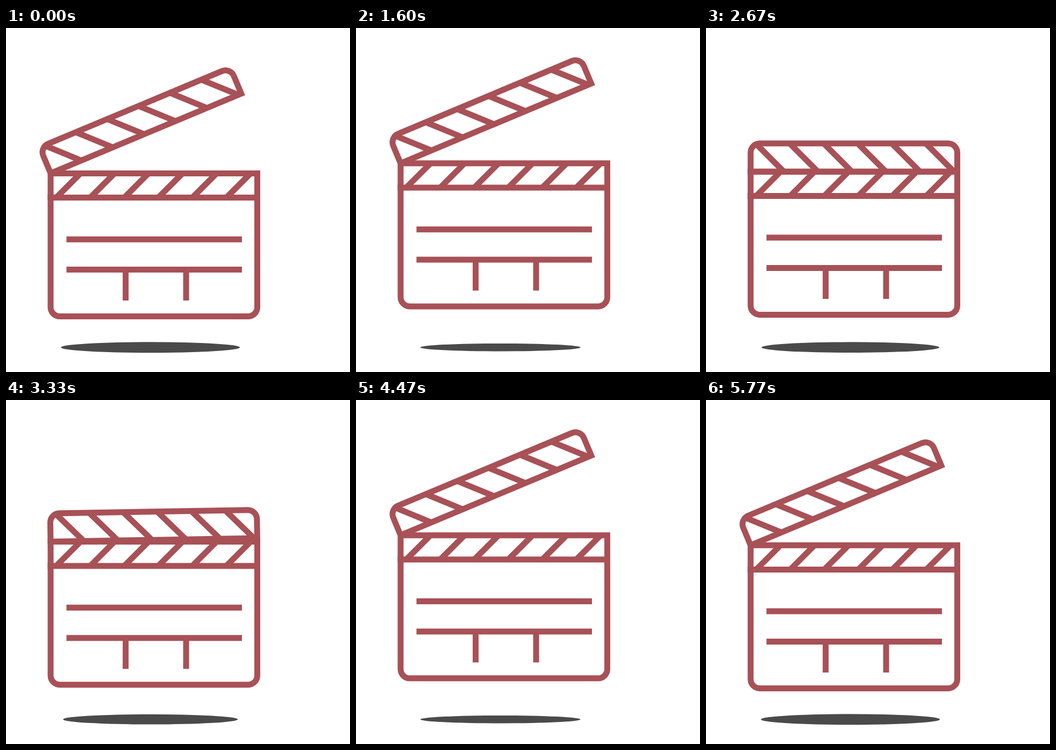
An HTML page for the animation above (5810 ms loop, 640 px wide and 640 px high).

```html
<!DOCTYPE html>
<html lang="en">
<head>
<meta charset="utf-8">
<title>Clapperboard</title>
<style>
html, body { margin: 0; height: 100%; overflow: hidden; background: #fff; }
svg { display: block; width: 100vw; height: 100vh; }
</style>
</head>
<body>
<svg viewBox="0 0 640 640">
  <ellipse id="shadow" cx="268.7" cy="594.2" fill="#4a4a4a"/>
  <g id="board" fill="none" stroke="#a85157" stroke-width="11">
    <path d="M83 270.4H467.5V519.5a17 17 0 0 1-17 17H100a17 17 0 0 1-17-17Z"/>
    <path d="M77.5 315.5H473M112.5 393.2H439M112.5 449.6H439M222.6 449.6V507M335.1 449.6V507"/>
    <path id="baseStripes"/>
    <g id="arm">
      <path d="M83 270.4V234.9a17 17 0 0 1 17-17H450.5a17 17 0 0 1 17 17V270.4Z"/>
      <path id="armStripes"/>
    </g>
    <path id="rays"/>
  </g>
</svg>
<script>
const LOOP = 5810, HALF = 1445, LIFT = 19.8;
const $ = id => document.getElementById(id);
const clamp = x => Math.max(0, Math.min(1, x));
const smooth = x => x * x * (3 - 2 * x);

const stripes = (x, y, dx, dy) =>
  Array.from({ length: 6 }, (_, i) => `M${x + i * 63.3} ${y}l${dx} ${dy}`).join('');
$('baseStripes').setAttribute('d', stripes(93.5, 315.5, 45, -45));
$('armStripes').setAttribute('d', stripes(92.5, 218, 52, 52));

function bezier(x1, y1, x2, y2) {
  const at = (a, b, s) => 3 * (1 - s) * s * ((1 - s) * a + s * b) + s ** 3;
  return x => {
    let lo = 0, hi = 1;
    for (let i = 0; i < 24; i++) {
      const mid = (lo + hi) / 2;
      if (at(x1, x2, mid) < x) lo = mid; else hi = mid;
    }
    return at(y1, y2, lo);
  };
}
const rise = bezier(.2, .1, .667, 1);
const fall = bezier(.33, .15, .7, .72);

// [time, angle] of the arm
const angles = [[0, 22.7], [1580, 22.7], [1900, 24.8], [2527, 0],
                [3250, 0], [3920, 24.4], [4190, 22.7], [LOOP, 22.7]];
function armAngle(t) {
  const i = angles.findIndex(k => k[0] > t);
  const [t0, a] = angles[i - 1], [t1, b] = angles[i];
  return a + (b - a) * smooth((t - t0) / (t1 - t0));
}

// Short burst beside the board as it shuts
const burst = [[486, 247, 535, 182], [496, 270.4, 573, 270.4], [486, 294, 535, 359]];
function rayPath(t) {
  const head = smooth(clamp((t - 2290) / 100)), tail = smooth(clamp((t - 2410) / 150));
  if (head <= tail) return '';
  return burst.map(([x, y, u, v]) => {
    const point = p => `${x + (u - x) * p} ${y + (v - y) * p}`;
    return `M${point(tail)}L${point(head)}`;
  }).join('');
}

function draw(now) {
  const t = now % LOOP;
  const u = Math.min(t, 4 * HALF - .01);
  const up = Math.floor(u / HALF) % 2 === 0, p = u % HALF / HALF;
  const lift = up ? rise(p) : 1 - fall(p);
  const shrink = smooth(up ? p : 1 - p);

  $('board').setAttribute('transform', `translate(0 ${-LIFT * lift})`);
  $('arm').setAttribute('transform', `rotate(${-armAngle(t)} 83 270.4)`);
  $('rays').setAttribute('d', rayPath(t));
  $('shadow').setAttribute('rx', 166.5 - 18 * shrink);
  $('shadow').setAttribute('ry', 10 - 2.8 * shrink);
}

const start = performance.now();
function tick() {
  draw(performance.now() - start);
  requestAnimationFrame(tick);
}
tick();
</script>
</body>
</html>
```
